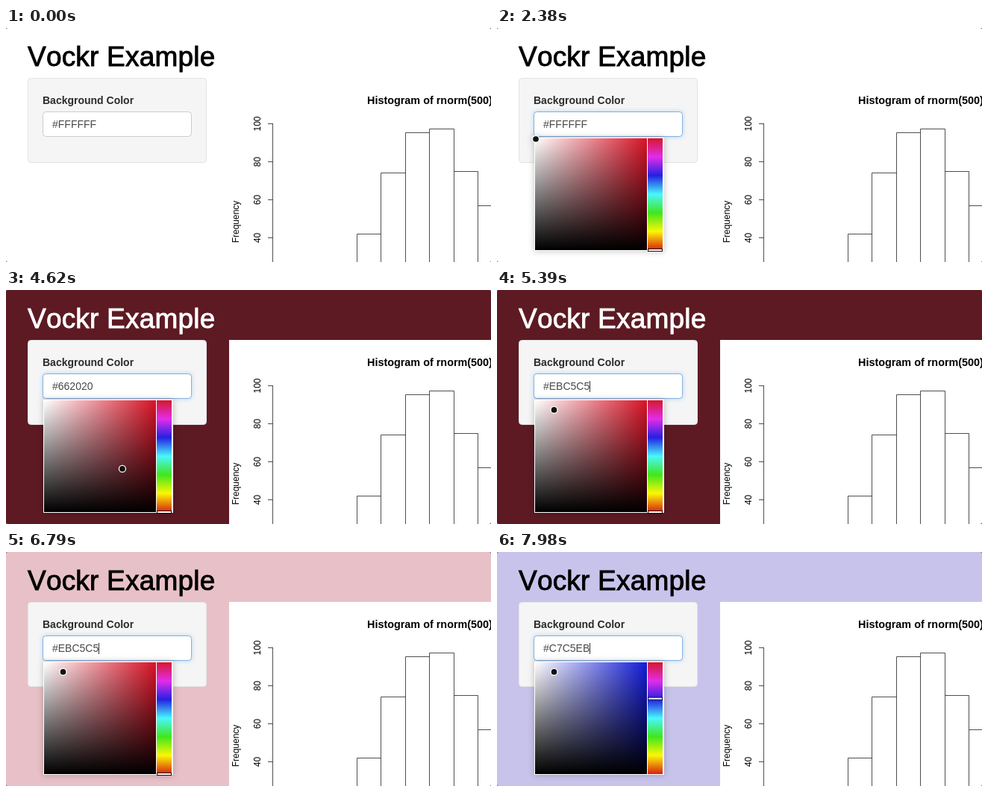
Animation of 650 by 314 pixels, one loop 8 s. Source, as an HTML page:

```html
<!DOCTYPE html>
<html lang="en">
<head>
<meta charset="utf-8">
<title>Background color picker</title>
<style>
  html, body { margin: 0; width: 100%; height: 100%; overflow: hidden; background: #777; }
  svg { display: block; border-radius: 3px; font-family: "Liberation Sans", Arial, sans-serif; }
  #title { font-size: 37px; letter-spacing: .2px; font-kerning: none; stroke-width: .9px; }
  .plot { fill: none; stroke: #222; stroke-width: .8px; }
  .tick { font-size: 12px; text-anchor: middle; }
  #picker { filter: drop-shadow(0 0 4px rgba(0, 0, 0, .25)); }
</style>
</head>
<body>
<svg width="650" height="314" viewBox="0 0 650 314">
  <defs>
    <linearGradient id="white">
      <stop stop-color="#fff"/><stop offset="1" stop-color="#fff" stop-opacity="0"/>
    </linearGradient>
    <linearGradient id="black" x2="0" y2="1">
      <stop stop-opacity="0"/><stop offset="1"/>
    </linearGradient>
    <linearGradient id="rainbow" x2="0" y2="1">
      <stop stop-color="#d5182c"/><stop offset=".167" stop-color="#e32ce9"/>
      <stop offset=".333" stop-color="#2420e2"/><stop offset=".5" stop-color="#48f7fc"/>
      <stop offset=".667" stop-color="#40e61c"/><stop offset=".833" stop-color="#fbf705"/>
      <stop offset="1" stop-color="#d8200f"/>
    </linearGradient>
    <filter id="blur" x="-10%" y="-50%" width="120%" height="200%"><feGaussianBlur stdDeviation="3"/></filter>
  </defs>

  <rect id="page" width="650" height="314"/>
  <text id="title" x="29" y="51">Vockr Example</text>

  <rect x="299" y="67" width="351" height="247" fill="#fff"/>
  <text x="484" y="102" font-size="14.4" font-weight="bold">Histogram of rnorm(500)</text>
  <text class="tick" transform="translate(312 260) rotate(-90)">Frequency</text>
  <g id="plot"></g>

  <rect x="29.5" y="67.5" width="239" height="113" rx="4" fill="#f5f5f5" stroke="#e3e3e3"/>
  <text x="49" y="102" font-size="14" font-weight="bold" fill="#2b2b2b">Background Color</text>
  <rect id="glow" x="49" y="112" width="200" height="34" rx="4" fill="#66afe9" opacity="0" filter="url(#blur)"/>
  <rect id="input" x="49.5" y="112.5" width="199" height="33" rx="4" fill="#fff"/>
  <text id="value" x="62" y="134" font-size="14" fill="#484848"></text>
  <path id="caret" d="M0 122v15" stroke="#333"/>

  <g id="picker">
    <rect x="50" y="147" width="174" height="152" fill="#fff"/>
    <rect id="hue" x="51" y="148" width="150" height="150"/>
    <rect x="51" y="148" width="150" height="150" fill="url(#white)"/>
    <rect x="51" y="148" width="150" height="150" fill="url(#black)"/>
    <rect x="202" y="148" width="20" height="150" fill="url(#rainbow)"/>
    <rect id="slider" x="202.5" width="19" height="3" fill="#fff" stroke="#111"/>
    <circle id="dot" r="4.5" fill="#111" stroke="#fff" stroke-width="1.3"/>
  </g>
</svg>
<script>
const $ = id => document.getElementById(id);
const LOOP = 8000, FOCUS = 1870;

// time, hue, saturation, value
const keys = [
  [2500, 0, 0, 1], [2660, 0, .15, .93], [3000, 0, .5, .7], [3350, 0, .75, .2], [3850, 0, .686, .4],
  [4700, 0, .686, .4], [5350, 0, .1617, .9216],
  [6930, 0, .1617, .9216], [7500, 243.16, .1617, .9216]
];
const pages = [[0, '#fff'], [4200, '#5d1a23'], [5530, '#e7c1c7'], [7660, '#c8c3eb']];

const pixel = n => Math.floor(n) + .5;
const countY = n => pixel(384 - 2.56 * n);
const barX = i => pixel(470.5 + 32.45 * i);

function drawPlot() {
  let path = 'M357.5 128V314', labels = '';
  for (let n = 40; n <= 100; n += 20) {
    const y = countY(n);
    path += `M351 ${y}h6.5`;
    labels += `<text class="tick" transform="translate(341 ${y}) rotate(-90)">${n}</text>`;
  }
  [42, 74, 95, 97, 75, 57].forEach((n, i, counts) => {
    const y = countY(n), side = countY(Math.max(n, counts[i - 1] || 0));
    path += `M${barX(i)} 320V${side}M${barX(i)} ${y}H${barX(i + 1)}`;
  });
  $('plot').innerHTML = `<path class="plot" d="${path}"/>${labels}`;
}

function colorAt(t) {
  const i = keys.findIndex(k => k[0] > t);
  if (i === 0) return keys[0].slice(1);
  if (i < 0) return keys.at(-1).slice(1);
  const a = keys[i - 1], b = keys[i], u = (t - a[0]) / (b[0] - a[0]);
  const e = u * u * (3 - 2 * u);
  return [1, 2, 3].map(j => a[j] + (b[j] - a[j]) * e);
}

function toHex(h, s, v) {
  const channel = n => {
    const k = (n + h / 60) % 6;
    const c = v * (1 - s * Math.max(0, Math.min(k, 4 - k, 1)));
    return Math.round(c * 255).toString(16).padStart(2, '0');
  };
  return '#' + (channel(5) + channel(3) + channel(1)).toUpperCase();
}

// The caret restarts its blink whenever the value changes.
function caretVisible(t) {
  if (t < FOCUS) return false;
  const drags = [[2500, 3850], [4700, 5350], [6930, 7500]];
  if (drags.some(([from, to]) => t >= from && t < to)) return true;
  const start = drags.reduce((last, [, to]) => t >= to ? to : last, FOCUS);
  return (t - start) % 1000 < 500;
}

function set(id, attrs) {
  for (const name in attrs) $(id).setAttribute(name, attrs[name]);
}

function draw(t) {
  const [h, s, v] = colorAt(t);
  const page = pages.findLast(p => t >= p[0])[1];
  const focus = Math.max(0, Math.min(1, (t - FOCUS) / 150));
  const mix = (a, b) => a + (b - a) * focus;

  set('page', { fill: page });
  const ink = page === pages[1][1] ? '#fff' : '#000';
  set('title', { fill: ink, stroke: ink });
  set('glow', { opacity: .45 * focus });
  set('input', { stroke: `rgb(${mix(204, 132)},${mix(204, 176)},${mix(204, 220)})` });

  $('value').textContent = toHex(h, s, v);
  const end = Math.floor(62 + $('value').getComputedTextLength()) + .5;
  set('caret', { transform: `translate(${end} 0)`, visibility: caretVisible(t) ? 'visible' : 'hidden' });

  set('picker', { visibility: t >= FOCUS ? 'visible' : 'hidden' });
  set('hue', { fill: `hsl(${h - 6}, 84%, 46%)` });
  set('dot', { cx: 52 + 151.5 * s, cy: 149 + 151.5 * (1 - v) });
  set('slider', { y: 296.5 - 150 * h / 360 });
}

function tick(now) {
  draw(now % LOOP);
  requestAnimationFrame(tick);
}

drawPlot();
draw(0);
requestAnimationFrame(tick);
</script>
</body>
</html>
```
